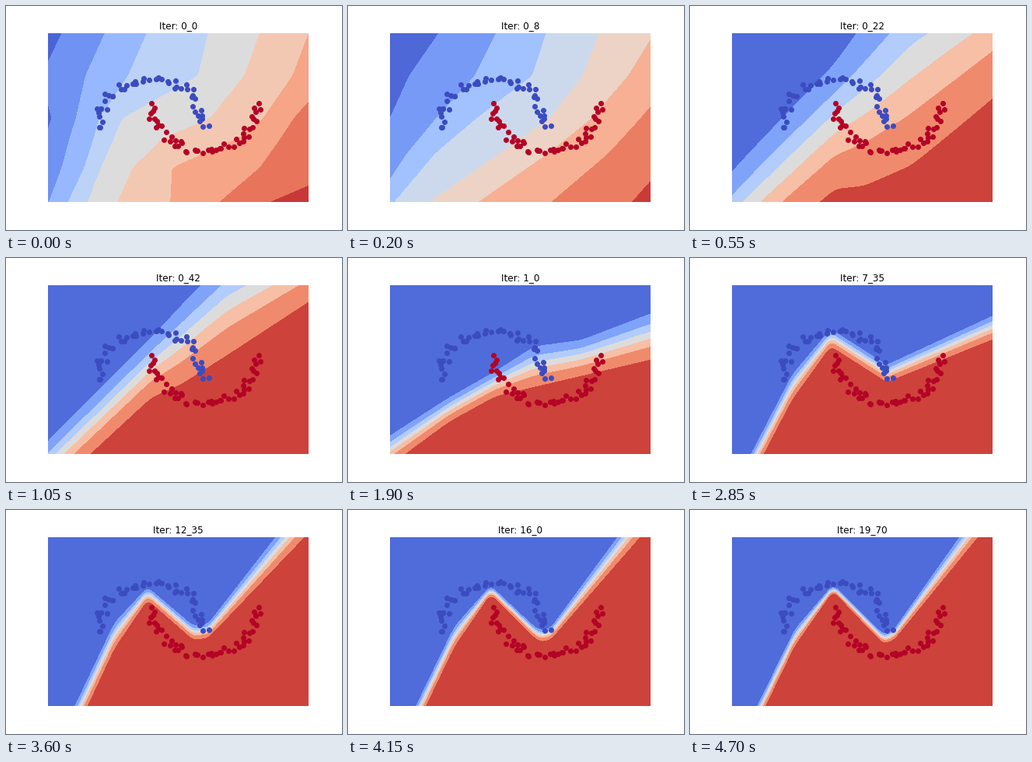
Write a matplotlib script that moves like this. It is 432 px wide and 288 px high and loops after 4.75 s.

```python
import numpy as np
import matplotlib.pyplot as plt
from matplotlib.animation import FuncAnimation

LEFT, RIGHT, TOP, BOTTOM = 54, 388.8, 34.56, 252
FRAMES, INTERVAL = 95, 50
FIRST_EPOCH = 38          # frames spent on epoch 0
UNIT = np.array([68, 62])  # pixels per data unit

xs = np.linspace(LEFT, RIGHT, 168)
ys = np.linspace(TOP, BOTTOM, 110)
rng = np.random.default_rng(4)


def logit(p):
    return np.log(p / (1 - p))


def extend(a, far):
    """Continue a sequence linearly past both ends."""
    a = np.asarray(a, float)
    return np.r_[a[0] - far * (a[1] - a[0]), a, a[-1] + far * (a[-1] - a[-2])]


def soft_line(s, knots, values, soft):
    """Polyline through the knots with rounded corners."""
    u, v = extend(knots, 50), extend(values, 50)
    return np.mean([np.interp(s + d, u, v) for d in np.linspace(-soft, soft, 9)], axis=0)


def field(levels, knots, by_row=False, soft=4, limits=None):
    """Logit surface; each knot is a column (or row) and where it meets every level."""
    s, t = (ys, xs) if by_row else (xs, ys)
    at, *edges = np.array(knots, float).T
    lines = np.array([soft_line(s, at, e, soft) for e in edges])
    lines = np.maximum.accumulate(lines, axis=0) + np.arange(len(lines))[:, None] * 0.2
    z = extend(logit(np.array(levels)), 40)
    surface = np.array([np.interp(t, extend(cut, 40), z) for cut in lines.T])
    if limits:
        surface = np.clip(surface, *logit(np.array(limits)))
    return surface if by_row else surface.T


def border(*knots, soft=5):
    """Sharp class border: x, upper edge and lower edge of the blend."""
    return field([0.15, 0.9], knots, soft=soft)


untrained = field([0.36, 0.44, 0.48, 0.52, 0.56, 0.64], [
    (35, 72, 181, 260, 326, 389, 500),
    (90, 46, 157, 247, 306, 368, 470),
    (145, 59, 120, 149, 262, 330, 410),
    (170, 50, 113, 139, 202, 300, 408),
    (208, 42, 101, 122, 163, 213, 443),
    (252, 30, 80, 105, 143, 211, 340),
], by_row=True, limits=(0.34, 0.655))

early = field([0.24, 0.40, 0.48, 0.56, 0.72], [
    (35, 117, 255, 323, 394, 535),
    (90, 79, 237, 302, 360, 490),
    (145, 54, 165, 259, 313, 445),
    (190, 35, 112, 195, 257, 420),
    (252, 5, 60, 105, 168, 365),
], by_row=True, limits=(0.17, 0.75))

diagonal = border((54, 236, 303), (187, 103, 180), (225, 62, 163),
                  (285, 0, 125), (389, -46, 57), soft=8)
shallow = border((54, 229, 267), (130, 180, 211), (190, 146, 178),
                 (240, 114, 166), (300, 106, 152), (389, 72, 131), soft=10)
bent = border((79, 252, 283), (132, 150, 182), (181, 92, 114),
              (253, 138, 160), (389, 75, 105))
zigzag = border((89, 252, 287), (140, 145, 178), (182, 100, 116),
                (240, 149, 167), (260, 147, 165), (347, 35, 74))
final = border((87, 252, 274), (135, 154, 175), (184, 97, 105),
               (248, 160, 172), (262, 155, 168), (347, 35, 64))

STAGES = [untrained, early, diagonal, shallow, bent, zigzag, final]
TIMES = [0, 4, 21, 38, 57, 72, 94]


def moon(center, sign, count=50, noise=0.05):
    """Noisy half circle; the sign picks the upper or the lower one."""
    a = np.linspace(0, np.pi, count)
    arc = sign * np.column_stack([np.cos(a), -np.sin(a)])
    return center + UNIT * (arc + rng.normal(0, noise, arc.shape))


fig = plt.figure(figsize=(6, 4), dpi=72, facecolor="white")
ax = fig.add_axes([0.125, 0.125, 0.775, 0.755])
ax.axis("off")
cmap = plt.get_cmap("coolwarm")
for points, tone in ((moon((187, 156), 1), 0.0), (moon((255, 125), -1), 1.0)):
    ax.scatter(*points.T, s=36, color=cmap(tone), zorder=3)
title = ax.set_title("", fontsize=12, fontfamily="DejaVu Sans")
drawn = []


def label(i):
    if i < FIRST_EPOCH:
        return f"Iter: 0_{2 * i}"
    epoch, part = divmod(i - FIRST_EPOCH, 3)
    return f"Iter: {epoch + 1}_{35 * part}"


def probability(i):
    """Class probability, blended in logit space between training stages."""
    k = min(np.searchsorted(TIMES, i, side="right") - 1, len(TIMES) - 2)
    a = (i - TIMES[k]) / (TIMES[k + 1] - TIMES[k])
    z = (1 - a) * STAGES[k] + a * STAGES[k + 1]
    return 1 / (1 + np.exp(-np.clip(z, -15, 15)))


def draw(i):
    while drawn:
        drawn.pop().remove()
    drawn.append(ax.contourf(xs, ys, probability(i), cmap=cmap))
    ax.set_xlim(LEFT, RIGHT)
    ax.set_ylim(BOTTOM, TOP)
    title.set_text(label(i))
    return []


anim = FuncAnimation(fig, draw, frames=FRAMES, interval=INTERVAL, repeat=True, repeat_delay=0)
plt.show()
```
